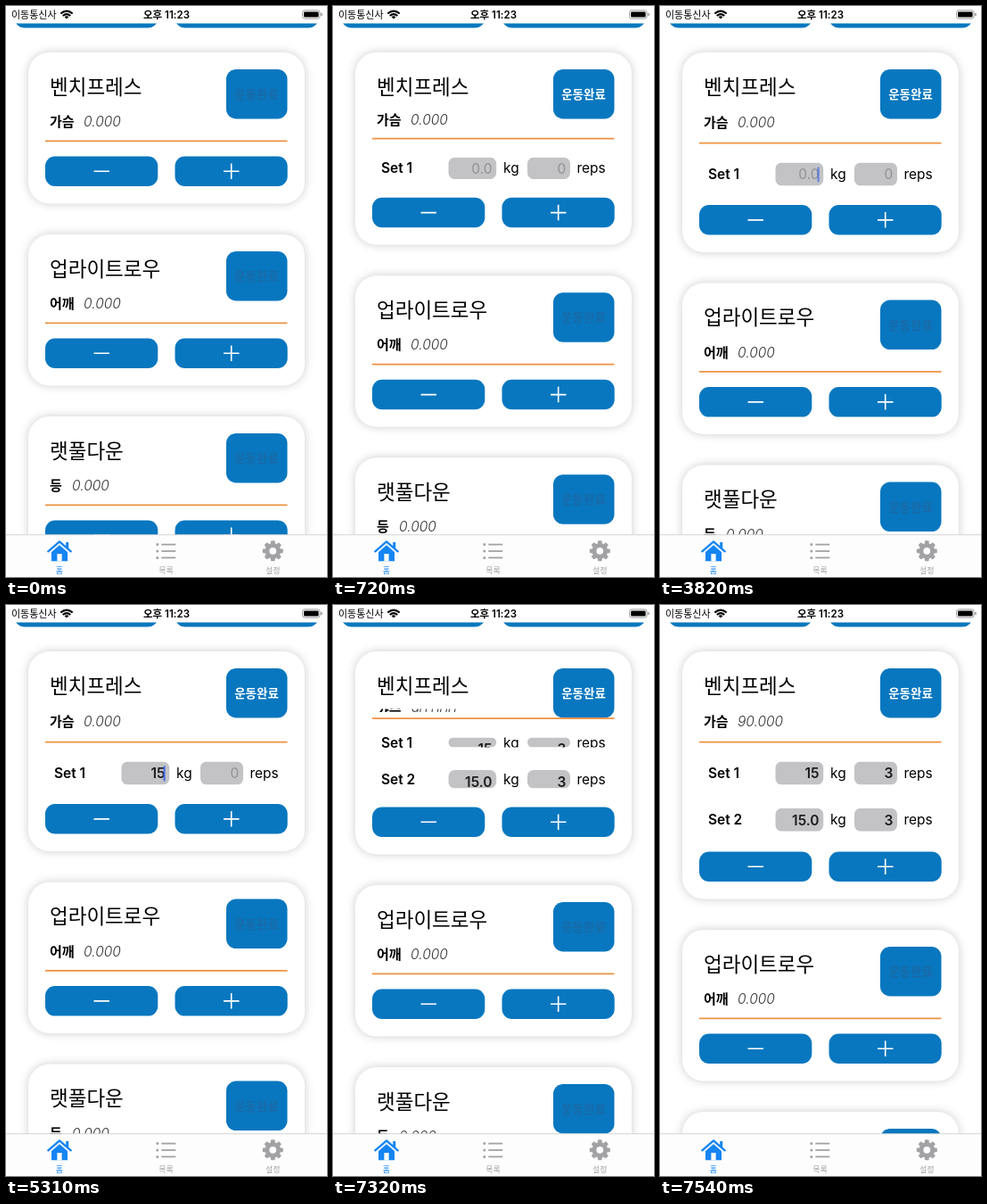
These frames come from a looping animation (360 px wide and 640 px high, 8000 ms). An HTML page:

```html
<!DOCTYPE html>
<html lang="ko">
<head>
<meta charset="utf-8">
<title>운동 기록</title>
<style>
  html, body { margin: 0; width: 100%; height: 100%; overflow: hidden; background: #fff; }
  svg { display: block; width: 100%; height: 100%; }
  text { font-family: Inter, "Noto Sans CJK KR", "Noto Sans CJK JP", "Noto Sans CJK", sans-serif; }
  .ko { font-family: "Noto Sans CJK KR", "Noto Sans CJK JP", "Noto Sans CJK", sans-serif; }
  .title { font-size: 22.5px; }
  .part { font-size: 15px; font-weight: 700; }
  .total { font-size: 15.5px; font-weight: 300; font-style: italic; fill: #333; }
  .done { font-size: 13.5px; font-weight: 700; text-anchor: middle; fill: #1b69a6; }
  .unit { font-size: 15.5px; }
  .set { font-size: 15.5px; font-weight: 600; }
  .value { font-size: 15.5px; font-weight: 600; text-anchor: end; fill: #1c1c1e; }
  .value.empty { font-weight: 400; fill: #929295; }
  .tab { font-size: 9px; text-anchor: middle; }
</style>
</head>
<body>
<svg id="stage" viewBox="0 0 360 640"></svg>
<script>
const BLUE = '#0877bf', ORANGE = '#ee9240', FIELD = '#c3c3c6', TINT = '#1585f2', GRAY = '#a2a2a5';
const LOOP = 8000, PITCH = 204;
const stage = document.getElementById('stage');

function el(parent, tag, attrs = {}, text) {
  const node = document.createElementNS('http://www.w3.org/2000/svg', tag);
  set(node, attrs);
  if (text !== undefined) node.textContent = text;
  return parent.appendChild(node);
}
function set(node, attrs) {
  for (const k in attrs) node.setAttribute(k, attrs[k]);
}
function label(parent, cls, x, y, text, attrs = {}) {
  return el(parent, 'text', { class: cls, x, y, ...attrs }, text);
}
function box(parent, x, y, width, height, rx, fill) {
  return el(parent, 'rect', { x, y, width, height, rx, fill });
}
function line(parent, d, stroke, width, attrs = {}) {
  return el(parent, 'path', { d, stroke, 'stroke-width': width, fill: 'none', ...attrs });
}
function clip(id) {
  return el(el(defs, 'clipPath', { id }), 'rect', { x: 0, width: 360 });
}

const defs = el(stage, 'defs');
const blur = el(defs, 'filter', { id: 'blur', x: '-10%', y: '-20%', width: '120%', height: '140%' });
el(blur, 'feGaussianBlur', { stdDeviation: 5.5 });

box(stage, 0, 0, 360, 640, 0, '#fff');
box(stage, 9, -10, 162, 34.5, 12, BLUE);
box(stage, 189, -10, 162, 34.5, 12, BLUE);

function card(title, part, totalX) {
  const g = el(stage, 'g');
  const shadow = box(g, 25, 52, 310, 169.5, 24, '#000');
  set(shadow, { opacity: .2, filter: 'url(#blur)' });
  const panel = box(g, 25, 52, 310, 169.5, 24, '#fff');
  label(g, 'ko title', 49, 98.5, title);
  box(g, 247, 71, 68.5, 55.5, 11, BLUE);
  const done = label(g, 'ko done', 281, 104, '운동완료');
  const subClip = el(g, 'g');
  const sub = el(subClip, 'g');
  label(sub, 'ko part', 49, 135, part);
  const total = label(sub, 'total', totalX, 135, '0.000');
  const rule = line(g, 'M44 151.3H315.5', ORANGE, 1.8);
  const buttons = el(g, 'g');
  box(buttons, 44, 168.5, 126.3, 33.5, 11, BLUE);
  box(buttons, 189.5, 168.5, 126.2, 33.5, 11, BLUE);
  line(buttons, 'M98.5 185.3H116M244 185.3H261.5M252.7 176.5V194', '#fff', 1.6);
  return { g, shadow, panel, done, subClip, sub, total, rule, buttons };
}

function setRow(parent, n) {
  const g = el(parent, 'g');
  const name = label(g, 'set', 54, 0, 'Set ' + n);
  const inner = el(g, 'g', { 'clip-path': `url(#row${n})` });
  const fields = [box(inner, 129.5, 0, 53.7, 26, 7, FIELD), box(inner, 218, 0, 48, 26, 7, FIELD)];
  const values = [label(inner, 'value', 178.5, 0, ''), label(inner, 'value', 261.3, 0, '')];
  const units = [label(inner, 'unit', 191, 0, 'kg'), label(inner, 'unit', 273.5, 0, 'reps')];
  return { g, name, fields, values, units, mask: clip('row' + n) };
}

function placeRow(row, mid, h) {
  const y = mid - h / 2;
  set(row.mask, { y, height: h });
  row.fields.forEach(f => set(f, { y, height: h, rx: Math.min(7, h / 2) }));
  row.values.forEach(v => set(v, { y: y + 18.7 }));
  [row.name, ...row.units].forEach(t => set(t, { y: mid + 5.6 }));
}

function fill(row, i, text, empty) {
  row.values[i].textContent = text;
  row.values[i].setAttribute('class', empty ? 'value empty' : 'value');
}

const first = card('벤치프레스', '가슴', 87);
const second = card('업라이트로우', '어깨', 87);
const third = card('랫풀다운', '등', 74);
const subMask = clip('sub');
set(first.subClip, { 'clip-path': 'url(#sub)' });
const rows = [setRow(first.g, 1), setRow(first.g, 2)];
const caret = box(first.g, 0, 180.3, 2, 17.2, 1, '#3f68e6');

function statusBar() {
  box(stage, 0, 0, 360, 19.5, 0, '#fff');
  label(stage, 'ko', 6, 13.6, '이동통신사', { 'font-size': 11 });
  label(stage, '', 180, 13.7, '오후 11:23', { 'font-size': 11.5, 'font-weight': 600, 'text-anchor': 'middle' });
  line(stage, 'M61.3 8.6Q68 2.6 74.7 8.6M63.7 11Q68 7.2 72.3 11', '#000', 2);
  el(stage, 'path', { d: 'M65.6 12.2Q68 10.4 70.4 12.2L68 14.6Z' });
  set(box(stage, 332.5, 4.9, 19.6, 9.2, 2.6, 'none'), { stroke: '#999', 'stroke-width': 1 });
  box(stage, 334, 6.4, 16.6, 6.2, 1.4, '#000');
  box(stage, 353.2, 7.8, 1.5, 3.4, .7, '#999');
}

function tabBar() {
  box(stage, 0, 592.5, 360, 48, 0, '#fdfdfd');
  line(stage, 'M0 592.7H360', '#c4c4c6', .7);

  el(stage, 'path', { d: 'M51 612L60 604.3L69 612V622.3H51Z', fill: TINT });
  box(stage, 57.4, 614, 5.2, 8.4, 0, '#fff');
  box(stage, 67.2, 601, 3, 7, 0, TINT);
  line(stage, 'M47.3 611.3L60 600.4L72.7 611.3', TINT, 2.4, { 'stroke-linecap': 'round', 'stroke-linejoin': 'round' });

  for (const y of [603.6, 611, 618.4]) {
    el(stage, 'circle', { cx: 169.8, cy: y, r: 1.5, fill: GRAY });
    line(stage, `M174.3 ${y}H190.3`, GRAY, 1.8);
  }

  const gear = el(stage, 'g', { transform: 'translate(299.3 610.8)' });
  el(gear, 'circle', { r: 6.4, fill: 'none', stroke: GRAY, 'stroke-width': 5 });
  for (let i = 0; i < 8; i++) {
    set(box(gear, -2.4, -11.5, 4.8, 4.6, 1.2, GRAY), { transform: `rotate(${i * 45})` });
  }

  label(stage, 'ko tab', 60, 635.5, '홈', { fill: TINT, 'font-weight': 500 });
  label(stage, 'ko tab', 179.5, 635.5, '목록', { fill: GRAY });
  label(stage, 'ko tab', 299.3, 635.5, '설정', { fill: GRAY });
}

statusBar();
tabBar();

// Latest value of a [time, value] list
function at(t, keys) {
  let value = keys[0][1];
  for (const [start, v] of keys) if (t >= start) value = v;
  return value;
}

const GROWTH = [[0, 0], [500, 3], [610, 25], [720, 46.3], [1920, 54.6], [7320, 58], [7430, 88], [7540, 108]];
const CARET = [[0, 0], [2140, 1], [2920, 0], [3160, .5], [3280, 1], [3820, .75], [3940, 0], [4180, .5], [4290, 1],
  [5070, 0], [5310, 1], [6640, .75], [6750, 0], [6990, .5], [7100, 1], [7210, 0]];

function draw(t) {
  const count = at(t, [[0, 0], [500, 1], [7320, 2]]);
  const grow = at(t, GROWTH);
  const rest = [0, 54.6, 108][count] - grow;
  const two = count === 2;

  set(first.shadow, { height: 169.5 + grow });
  set(first.panel, { height: 169.5 + grow });
  set(first.buttons, { transform: `translate(0 ${grow})` });
  set(second.g, { transform: `translate(0 ${PITCH + grow})` });
  set(third.g, { transform: `translate(0 ${2 * PITCH + grow})` });

  const subShift = (count ? 1.2 : 0) - rest * (two ? .25 : .33);
  const subHeight = 20 - rest * .33;
  set(first.sub, { transform: `translate(0 ${subShift})` });
  set(subMask, { y: 129.6 + subShift - subHeight / 2, height: subHeight });
  set(first.rule, { transform: `translate(0 ${(count ? 2.4 : 0) - rest * (two ? .53 : .62)})` });
  first.done.style.fill = count ? '#fff' : '';
  first.total.textContent = at(t, [[0, '0.000'], [6020, '45.000'], [7320, '90.000']]);

  rows.forEach((row, i) => set(row.g, { display: i < count ? 'inline' : 'none' }));
  placeRow(rows[0], 188.5 - rest * (two ? .69 : .8), 26 - rest * (two ? .3 : .2));
  placeRow(rows[1], 240.8 - rest * .91, 26 - rest * .11);
  fill(rows[0], 0, at(t, [[0, '0.0'], [4290, '1'], [4440, '15']]), t < 4290);
  fill(rows[0], 1, t < 6020 ? '0' : '3', t < 6020);
  fill(rows[1], 0, '15.0');
  fill(rows[1], 1, '3');

  set(caret, { x: t < 5900 ? 176.6 : 259.4, opacity: at(t, CARET) });
}

const begin = performance.now();
function tick() {
  draw((performance.now() - begin) % LOOP);
  requestAnimationFrame(tick);
}
tick();
</script>
</body>
</html>
```
